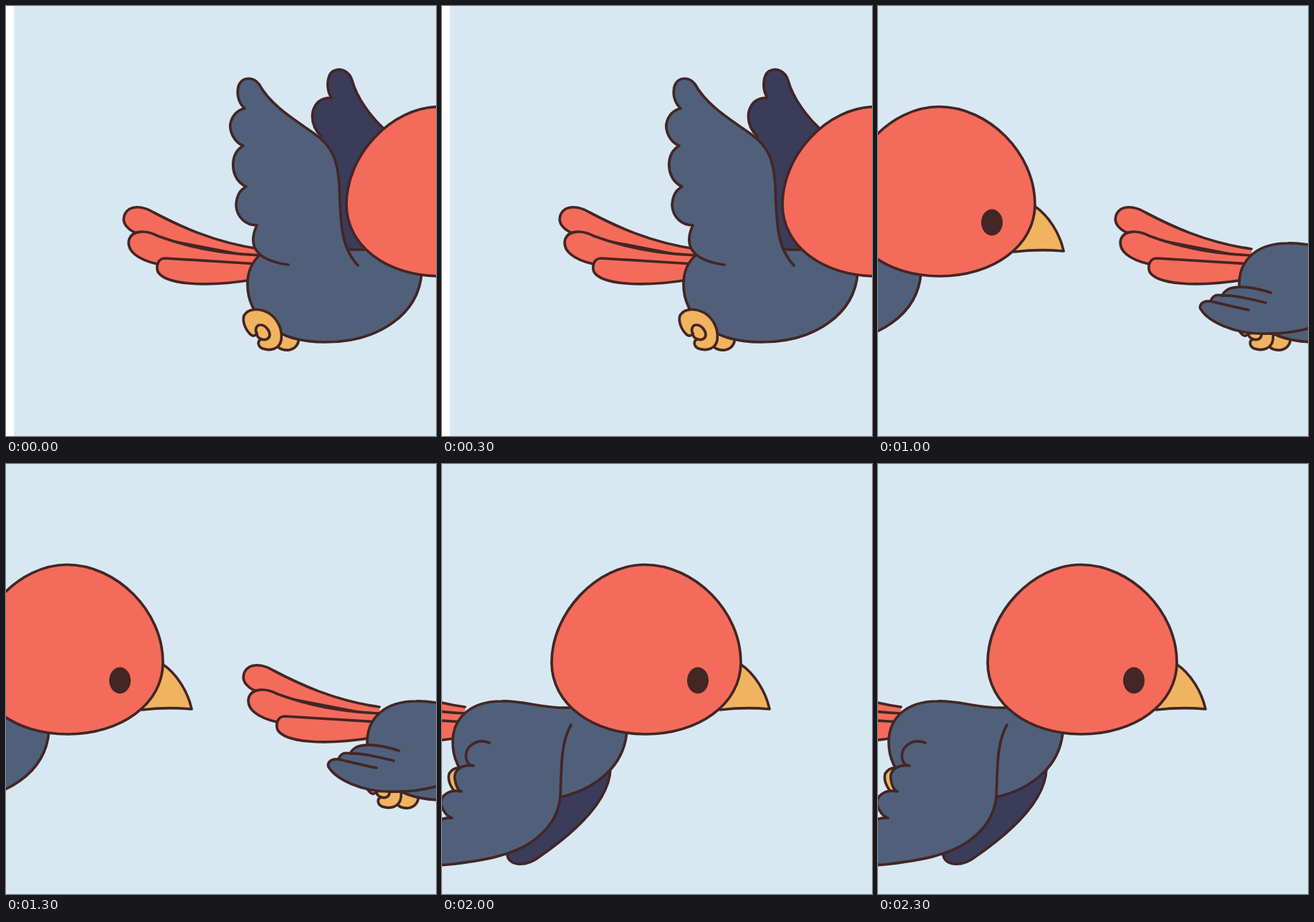
These frames come from a looping animation (600x600 px, 2.5 s). An HTML page:

```html
<!DOCTYPE html>
<html lang="en">
<head>
<meta charset="utf-8">
<title>Flying bird</title>
<style>
  html, body { margin: 0; width: 100%; height: 100%; overflow: hidden; background: #fff; }
  svg { display: block; width: 600px; height: 600px; }
  g { fill: none; stroke: #432625; stroke-width: 3.7; stroke-linecap: round; stroke-linejoin: round; }
</style>
</head>
<body>
<svg id="stage" viewBox="0 0 600 600"></svg>
<script>
const STEP = 500;
const RED = '#f46b5b', BLUE = '#51607a', NAVY = '#3a3c5a', GOLD = '#f0b461', DARK = '#432625';

const path = (d, fill = 'none') => `<path d="${d}" fill="${fill}"/>`;

const tail = [
  'M354 339C290 330 240 306 206 288C190 278 172 278 166 290C160 303 170 314 190 320L355 352',
  'M356 348C300 346 255 337 212 321C195 312 177 313 172 325C167 342 185 354 211 360L350 372',
  'M352 360L222 352C212 352 209 363 212 371C222 388 275 393 344 382'
].map(d => path(d, RED)).join('');

const backFoot = path('M380 463C372 476 385 481 395 480C405 478 410 470 408 460', GOLD);

const body = path('M500 340C465 342 437 330 405 331C360 331 337 356 337 388' +
  'C337 430 372 469 445 469C520 469 576 430 580 372', BLUE);

const frontFoot =
  path('M350 457C348 460 345 461 342 459C336 454 329 442 332 432C338 422 352 421 366 428' +
    'C380 437 386 452 384 466C382 478 370 482 358 478C350 474 351 466 357 465C353 464 350 461 350 457Z', GOLD) +
  path('M350 457C347 452 349 445 355 445C362 445 368 453 368 459C368 464 362 467 357 465');

const head =
  path('M738 279C758 292 774 318 779 342Q745 339 710 343', GOLD) +
  path('M475 277C475 208 538 140.5 605 140.5C674 140.5 739 205 739 277' +
    'C739 335 680 377 606 377C532 377 475 335 475 277Z', RED) +
  `<ellipse cx="679" cy="302" rx="15" ry="18.5" fill="${DARK}" stroke="none"/>`;

// Wing poses: far wing (behind the body), near wing, extra feather lines
const poses = {
  up: {
    far: 'M440 182C430 172 426 160 428 148C431 135 440 128 454 128C446 115 448 97 456 91' +
      'C467 85 479 91 483 104C490 130 510 155 526 170L530 340L470 345',
    near: 'M394 361C365 357 332 345 350 306C335 306 322 295 321 278C322 262 328 256 335 252' +
      'C320 245 316 230 317 218C318 206 324 199 331 195C318 190 312 175 313 165C315 153 323 145 333 143' +
      'C322 133 322 118 325 110C330 99 345 98 353 109C370 140 405 160 430 178' +
      'C455 195 463 215 465 250C467 295 465 335 491 362'
  },
  raised: {
    far: 'M405 234C390 210 398 176 429 185C425 160 434 132 458 128C470 127 472 138 469 152' +
      'C468 180 476 210 486 228L500 340L450 340',
    near: 'M394.5 378C365 381 336 376 325 358C321 350 324 344 330 342C306 336 300 300 326.5 292' +
      'C304 288 298 262 319.5 248C304 240 300 203 330 198C326 180 332 136 350 136' +
      'C362 136 361 148 365 164C371 195 390 225 410 239C432 250 443 265 445 282C452 310 465 335 487 360'
  },
  folded: {
    near: 'M381 400C360 393 335 389 322 395C317 398 314 402 313 404C302 401 298 408 297 412' +
      'C283 411 280 420 284 424C294 440 330 457 365 457' +
      'C395 458 415 455 433 450C460 442 490 432 494 420C496 410 478 395 480 378',
    lines: ['M313 404C330 403 352 409 374 414', 'M297 412C310 415 330 420 350 424']
  },
  lowered: {
    near: 'M380 400C360 400 340 440 326 462C314 468 314 488 325 496C308 497 306 520 315 529' +
      'C310 528 301 526 297 535C294 545 300 560 320 559C350 555 400 462 434 450' +
      'C462 440 492 432 494.5 420C496 410 478 395 480 378'
  },
  down: {
    far: 'M557 425C556 468 510 512 458 548C440 562 415 562 413 545L470 450',
    near: 'M388 389C370 382 352 395 356 412C358 419 362 421 366 421C348 419 338 428 340 440' +
      'C342 452 346 456 349 457C330 453 318 465 321 476C325 488 330 492 336 494' +
      'C312 492 300 510 300 540C302 560 322 560 330 559C385 553 420 545 446 528' +
      'C470 511 484 492 487 465C489 425 487 390 502 364'
  }
};

function bird(x, { far, near, lines = [] }) {
  const feathers = lines.map(d => path(d)).join('');
  return `<g transform="translate(${x})">` + (far ? path(far, NAVY) : '') +
    tail + backFoot + body + frontFoot + path(near, BLUE) + feathers + head + '</g>';
}

// left edge of the sky, wing pose, bird positions
const steps = [
  [11, 'up', [0]],
  [0, 'raised', [-601.5, 81.5]],
  [0, 'folded', [-520, 167]],
  [0, 'lowered', [-434.5, 280]],
  [0, 'down', [-322]]
];

const stage = document.getElementById('stage');
stage.innerHTML = steps.map(([left, pose, xs]) =>
  `<g display="none"><rect x="${left}" width="${600 - left}" height="600" fill="#d8e8f2" stroke="none"/>` +
  xs.map(x => bird(x, poses[pose])).join('') + '</g>').join('');

const scenes = [...stage.children];
let shown = -1;
const start = performance.now();

function tick() {
  const t = performance.now() - start;
  const i = Math.floor(t / STEP) % scenes.length;
  if (i !== shown) {
    scenes.forEach((s, k) => s.setAttribute('display', k === i ? 'inline' : 'none'));
    shown = i;
  }
  requestAnimationFrame(tick);
}
tick();
</script>
</body>
</html>
```
